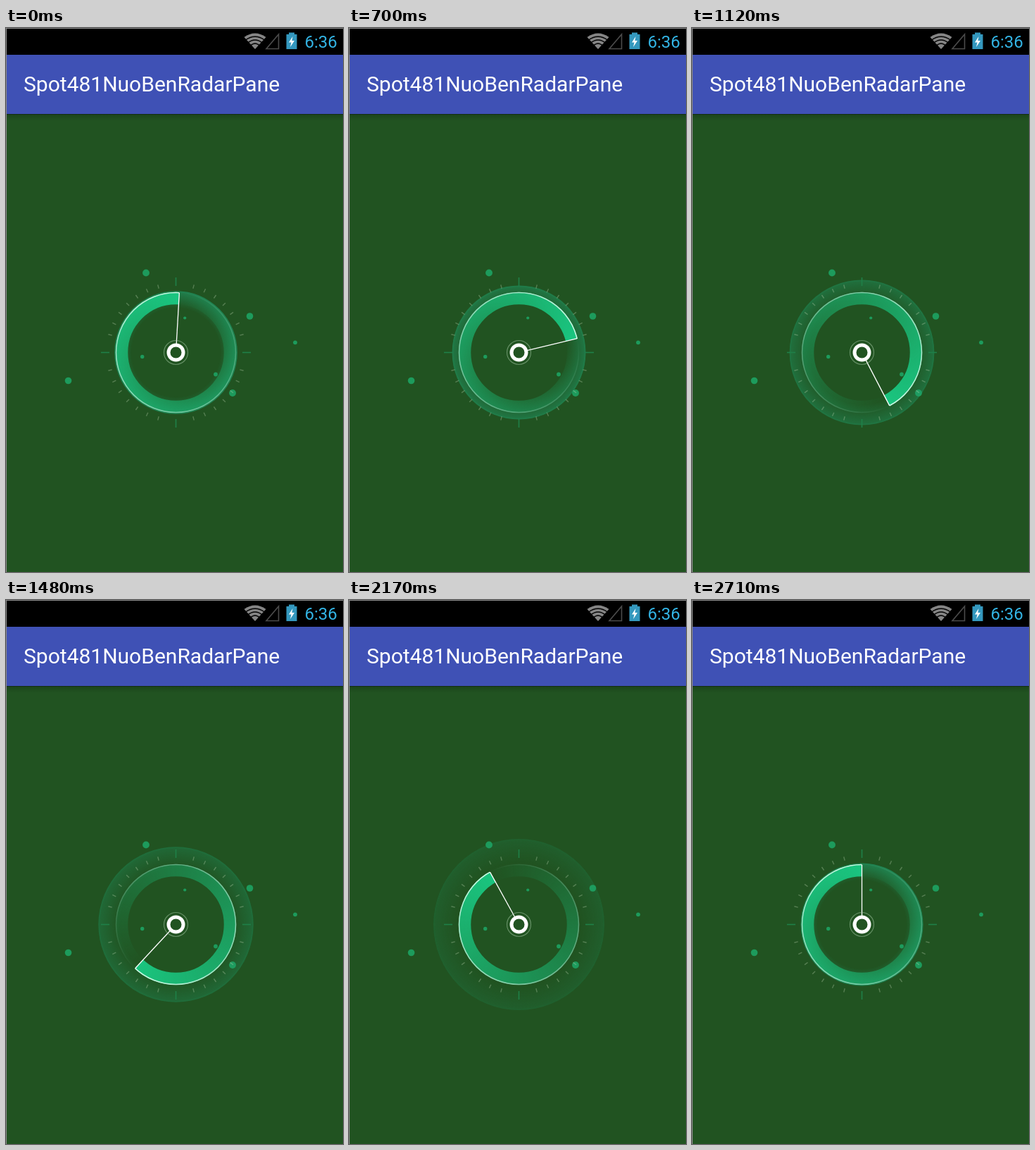
An HTML page with a canvas that plays this animation: 479x772 px, repeating every 2810 ms.

```html
<!DOCTYPE html>
<html lang="en">
<head>
<meta charset="utf-8">
<title>Radar dial</title>
<style>
  html, body { margin: 0; width: 100%; height: 100%; overflow: hidden; background: #215321; }
  body { position: relative; font-family: Roboto, "Noto Sans", sans-serif; }
  canvas, svg { position: absolute; left: 0; top: 0; display: block; }
  .status { position: absolute; left: 0; top: 0; width: 100%; height: 38px; background: #000; }
  .clock { position: absolute; left: 424.5px; top: 5px; font-size: 24px; line-height: 30px; color: #33b5e5; }
  .bar { position: absolute; left: 0; top: 38px; width: 100%; height: 84px; background: #3f51b5; }
  .title { position: absolute; left: 25px; top: 24px; font-size: 30px; line-height: 36px; color: #fff; white-space: nowrap; }
  .shade { position: absolute; left: 0; top: 122px; width: 100%; height: 10px;
    background: linear-gradient(rgba(0,0,0,.45) 0 1px, rgba(0,0,0,.17) 1px, transparent); }
  .edge { position: absolute; inset: 0; border: solid #8a8a8a; border-width: 1px 0 0 1px; }
</style>
</head>
<body>
<canvas id="dial" width="479" height="772"></canvas>
<div class="status">
  <svg width="479" height="38">
    <path d="M354 30 L338.5 13 Q354 2 369.5 13Z" fill="#858585"/>
    <g fill="none" stroke="#000" stroke-width="1.4">
      <path d="M340 17.5Q354 7 368 17.5"/>
      <path d="M343 21.5Q354 12.5 365 21.5"/>
      <path d="M347 25.5Q354 18.5 361 25.5"/>
    </g>
    <path d="M370 29.5H387.5V9Z" fill="none" stroke="#4b4b4b" stroke-width="1.6"/>
    <path d="M402 6.5h8v2.5h3.5v21h-15v-21h3.5z" fill="#3498be"/>
    <path d="M407.5 12L402 20.5h3.5L404 27l6-9h-3.7z" fill="#fff"/>
  </svg>
  <div class="clock">6:36</div>
</div>
<div class="bar"><div class="title">Spot481NuoBenRadarPane</div></div>
<div class="shade"></div>
<div class="edge"></div>
<script>
const ctx = document.getElementById("dial").getContext("2d");
const CX = 241.5, CY = 460.5, TAU = Math.PI * 2;
const LOOP = 2810;
const STEPS = [0, 150, 300, 430, 580, 700, 850, 970, 1120, 1240, 1360,
               1480, 1600, 1720, 1870, 2020, 2170, 2290, 2410, 2560, 2710];
// x, y, radius
const DOTS = [[199, 347.5, 4.9], [346.5, 409, 4.8], [411, 446.3, 2.9], [88.5, 500.5, 4.8],
              [322, 518, 4.9], [298, 491.5, 2.9], [193.7, 466.5, 2.7], [254.2, 411.5, 2.1]];

function circle(x, y, r) {
  ctx.beginPath();
  ctx.arc(x, y, r, 0, TAU);
}

function ring(r, width, style) {
  circle(0, 0, r);
  ctx.lineWidth = width;
  ctx.strokeStyle = style;
  ctx.stroke();
}

function ray(angle, from, to, width, style) {
  const s = Math.sin(angle), c = -Math.cos(angle);
  ctx.beginPath();
  ctx.moveTo(s * from, c * from);
  ctx.lineTo(s * to, c * to);
  ctx.lineWidth = width;
  ctx.strokeStyle = style;
  ctx.stroke();
}

// Transparent just ahead of the needle, solid just behind it
function tail(angle, rgb, alpha) {
  const g = ctx.createConicGradient(angle - Math.PI / 2, 0, 0);
  g.addColorStop(0, `rgba(${rgb},0)`);
  g.addColorStop(1, `rgba(${rgb},${alpha})`);
  return g;
}

function drawDots() {
  ctx.fillStyle = "#1d9b5c";
  for (const [x, y, r] of DOTS) {
    circle(x, y, r);
    ctx.fill();
  }
}

function drawPulse(p) {
  const r = 87 + 37.5 * p, alpha = 0.58 - 0.46 * p;
  const g = ctx.createRadialGradient(0, 0, r * 0.72, 0, 0, r);
  g.addColorStop(0, "rgba(32,160,110,0)");
  g.addColorStop(0.6, `rgba(32,160,110,${alpha * 0.6})`);
  g.addColorStop(1, `rgba(32,160,110,${alpha})`);
  circle(0, 0, r);
  ctx.fillStyle = g;
  ctx.fill();
  ring(r - 1, 2, `rgba(32,160,110,${alpha * 0.25})`);
}

function drawTicks() {
  for (let deg = 0; deg < 360; deg += 90) {
    ray(deg * TAU / 360, 94.5, 106.5, 1.6, "#1f8048");
    for (let k = 15; k <= 75; k += 10) {
      ray((deg + k) * TAU / 360, 94, 99.5, 1.4, "rgba(190,215,180,.34)");
    }
  }
}

function draw(p) {
  const angle = p * TAU;
  ctx.clearRect(0, 0, 479, 772);
  drawDots();
  ctx.save();
  ctx.translate(CX, CY);
  drawPulse(p);
  drawTicks();
  ring(77, 17.5, tail(angle, "26,200,130", 0.97));
  ring(85, 1.5, tail(angle, "225,255,240", 0.9));
  ray(angle, 12, 85, 1.3, "#fff");
  ring(17, 1.2, "rgba(170,205,170,.5)");
  ring(10.5, 5, "#fff");
  ctx.restore();
}

function progress(t) {
  const x = 0.061 + t / 2870;
  return x < 1 ? (1 - Math.cos(Math.PI * x)) / 2 : 0;
}

let shown = -1;
function tick() {
  const now = performance.now() % LOOP;
  const step = STEPS.findLast(s => s <= now);
  if (step !== shown) {
    shown = step;
    draw(progress(step));
  }
  requestAnimationFrame(tick);
}
tick();
</script>
</body>
</html>
```
